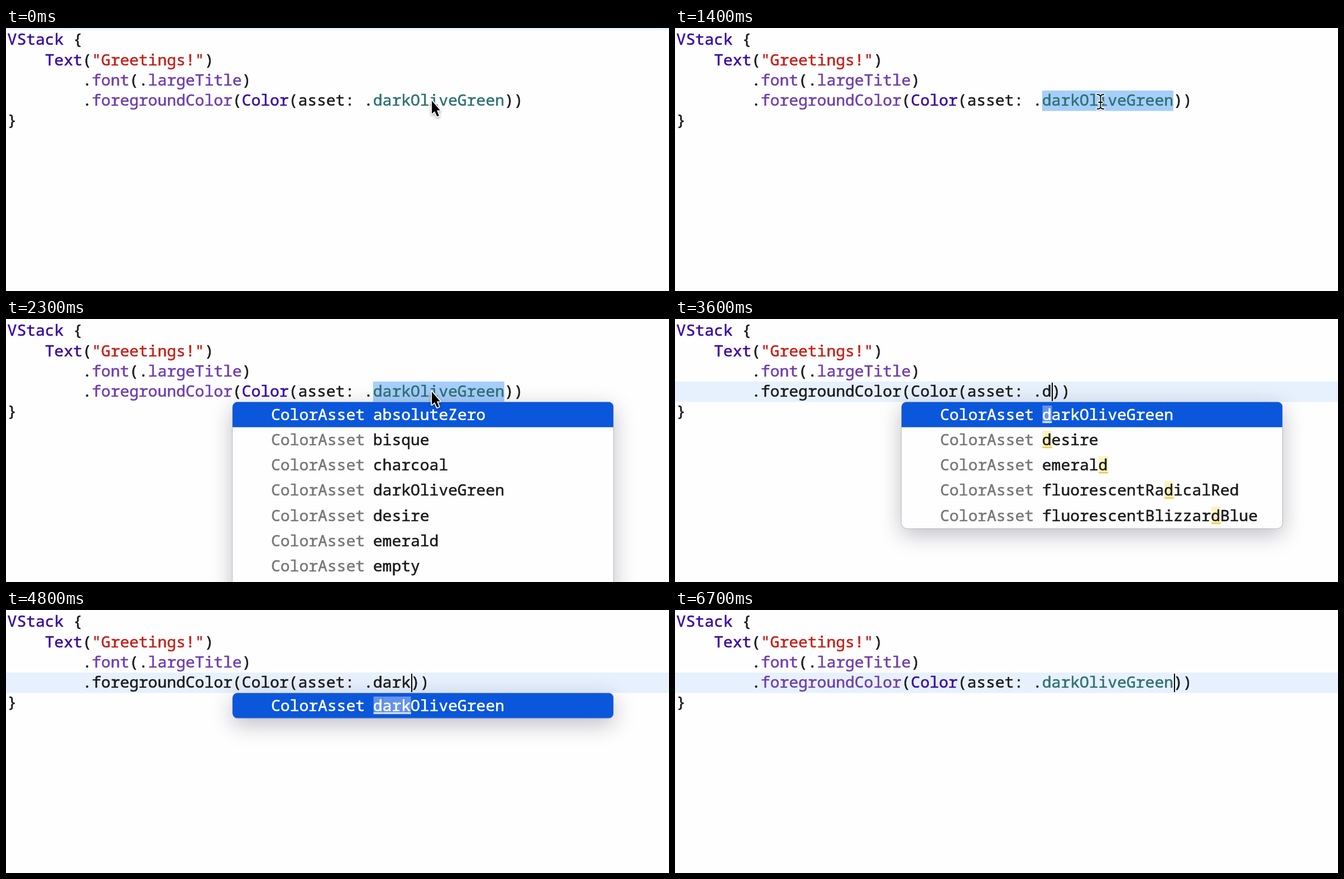
An HTML page with a canvas that plays this animation: 1188x471 px, repeating every 6800 ms.

```html
<!DOCTYPE html>
<html lang="en">
<head>
<meta charset="utf-8">
<title>Code completion</title>
<style>
  html, body { margin: 0; width: 100%; height: 100%; overflow: hidden; background: #fefefe; }
  canvas { display: block; }
</style>
</head>
<body>
<canvas id="stage" width="1188" height="471"></canvas>
<script>
const ctx = document.getElementById('stage').getContext('2d');
const LOOP = 6800;
const CELL = 16.8, LEFT = 2.6, LINE = 36.25, BASE = 30.4;
const ROW = 45.3;
const POPUP = { x: 406, y: 148.5, w: 682.5, r: 9 };
const NAME_COL = 39, TYPE_COL = 28.12;

const INK = '#1d1d1f', TYPE = '#3a0ca3', CALL = '#6f3fae', STRING = '#c5221a', ASSET = '#2f7275';
const GREY = '#78787a', BLUE = '#0a57db', LINE_TINT = '#e7f1fd', SELECTION = '#a6cefa';

const NAME = 'darkOliveGreen';
const ITEMS = ['absoluteZero', 'bisque', 'charcoal', NAME, 'desire', 'emerald', 'empty',
  'fluorescentRadicalRed', 'fluorescentBlizzardBlue'];

// Times in ms
const IBEAM = 400, CLICK = 600, SELECT = 800, OPEN = 1800, ACCEPT = 5400, RECOLOR = 6200;
const KEYS = [[3600, 'd'], [4300, 'da'], [4500, 'dar'], [4700, 'dark'], [ACCEPT, NAME]];

const colX = col => LEFT + col * CELL;

// Draws each glyph in its own cell and returns the next column.
// The thin outline gives a medium weight.
function write(text, col, y, color) {
  ctx.fillStyle = ctx.strokeStyle = color;
  ctx.lineWidth = 0.6;
  for (const ch of text) {
    const x = colX(col++);
    ctx.fillText(ch, x, Math.round(y));
    ctx.strokeText(ch, x, Math.round(y));
  }
  return col;
}

function codeLine(row, col, tokens) {
  for (const [text, color = INK] of tokens) col = write(text, col, BASE + row * LINE, color);
}

function band(x, w, color) {
  ctx.fillStyle = color;
  ctx.fillRect(x, 112, w, 36.5);
}

function caret(col) {
  ctx.fillStyle = '#000';
  ctx.fillRect(Math.round(colX(col) + 0.6), 114, 2, 33);
}

// Indices of the query letters found in order, or null.
function match(name, query) {
  const hits = [];
  let from = 0;
  for (const ch of query) {
    const i = name.toLowerCase().indexOf(ch, from);
    if (i < 0) return null;
    hits.push(i);
    from = i + 1;
  }
  return hits;
}

function popup(query) {
  const rows = ITEMS.map(name => [name, match(name, query)]).filter(([, hits]) => hits);
  const { x, y, w, r } = POPUP;
  const box = new Path2D();
  box.roundRect(x, y, w, rows.length * ROW, r);

  ctx.save();
  ctx.shadowColor = 'rgba(20,20,50,.28)';
  ctx.shadowBlur = 38;
  ctx.shadowOffsetY = 11;
  ctx.fillStyle = '#fefefe';
  ctx.fill(box);
  ctx.restore();
  ctx.strokeStyle = 'rgba(0,0,0,.25)';
  ctx.lineWidth = 1.2;
  ctx.stroke(box);

  ctx.save();
  ctx.clip(box);
  ctx.fillStyle = '#fefefe';
  ctx.fill(box);
  ctx.fillStyle = BLUE;
  ctx.fillRect(x, y, w, ROW);
  rows.forEach(([name, hits], i) => {
    const top = y + i * ROW, base = top + 32;
    for (const hit of hits) {
      ctx.fillStyle = i ? '#fcf3be' : '#6594ea';
      ctx.fillRect(colX(NAME_COL + hit) + 0.7, top + 6.5, CELL, 32);
    }
    write('ColorAsset', TYPE_COL, base, i ? GREY : '#fff');
    write(name, NAME_COL, base, i ? INK : '#fff');
    for (const hit of hits) {
      ctx.fillStyle = i ? '#ecc63a' : '#fff';
      ctx.fillRect(colX(NAME_COL + hit) + 0.7, top + 35, CELL, 2);
    }
  });
  ctx.restore();
}

function arrow() {
  const shape = new Path2D('M763 130v23.5l5.2-4.6 4.2 9.6 3.6-1.6-4.1-9.3h6z');
  ctx.save();
  ctx.lineJoin = 'round';
  ctx.strokeStyle = '#fff';
  ctx.lineWidth = 3.5;
  ctx.shadowColor = 'rgba(0,0,0,.35)';
  ctx.shadowBlur = 4;
  ctx.shadowOffsetY = 2;
  ctx.stroke(shape);
  ctx.restore();
  ctx.fillStyle = '#000';
  ctx.fill(shape);
}

function ibeam() {
  const shape = new Path2D('M756.5 119q6 0 6 4.5v17q0 4.5-6 4.5M768.5 119q-6 0-6 4.5M762.5 140.5q0 4.5 6 4.5M759 133h7');
  ctx.lineCap = 'round';
  for (const [color, width] of [['#fff', 5], ['#111', 2]]) {
    ctx.strokeStyle = color;
    ctx.lineWidth = width;
    ctx.stroke(shape);
  }
}

function draw(t) {
  const key = KEYS.filter(([at]) => t >= at).pop();
  const typed = key ? key[1] : NAME;
  const plain = key && t < RECOLOR;
  const tint = color => plain ? INK : color;
  const blinkOn = key && Math.floor((t - key[0]) / 500) % 2 === 0;

  ctx.fillStyle = '#fefefe';
  ctx.fillRect(0, 0, 1188, 471);
  if (t < CLICK) {
    ctx.fillStyle = LINE_TINT;
    ctx.fillRect(0, 0, 1188, 3.5);
  } else if (t < SELECT || key) {
    band(0, 1188, LINE_TINT);
  } else {
    band(colX(NAME_COL), NAME.length * CELL, SELECTION);
  }

  ctx.font = '500 28px "Noto Sans Mono", "DejaVu Sans Mono", monospace';
  ctx.lineJoin = 'round';
  codeLine(0, 0, [['VStack', TYPE], [' {']]);
  codeLine(1, 4, [['Text', TYPE], ['('], ['"Greetings!"', STRING], [')']]);
  codeLine(2, 8, [['.'], ['font', CALL], ['(.'], ['largeTitle', CALL], [')']]);
  codeLine(3, 8, [['.'], ['foregroundColor', tint(CALL)], ['('], ['Color', tint(TYPE)],
    ['(asset: .'], [typed, tint(ASSET)], ['))']]);
  codeLine(4, 0, [['}']]);

  if (t >= CLICK && t < SELECT) caret(45);
  if (blinkOn) caret(NAME_COL + typed.length);
  if (t >= OPEN && t < ACCEPT) popup(key ? typed : '');
  if (!key) (t >= IBEAM && t < OPEN ? ibeam : arrow)();
}

const start = performance.now();
function tick() {
  draw((performance.now() - start) % LOOP);
  requestAnimationFrame(tick);
}
tick();
</script>
</body>
</html>
```
